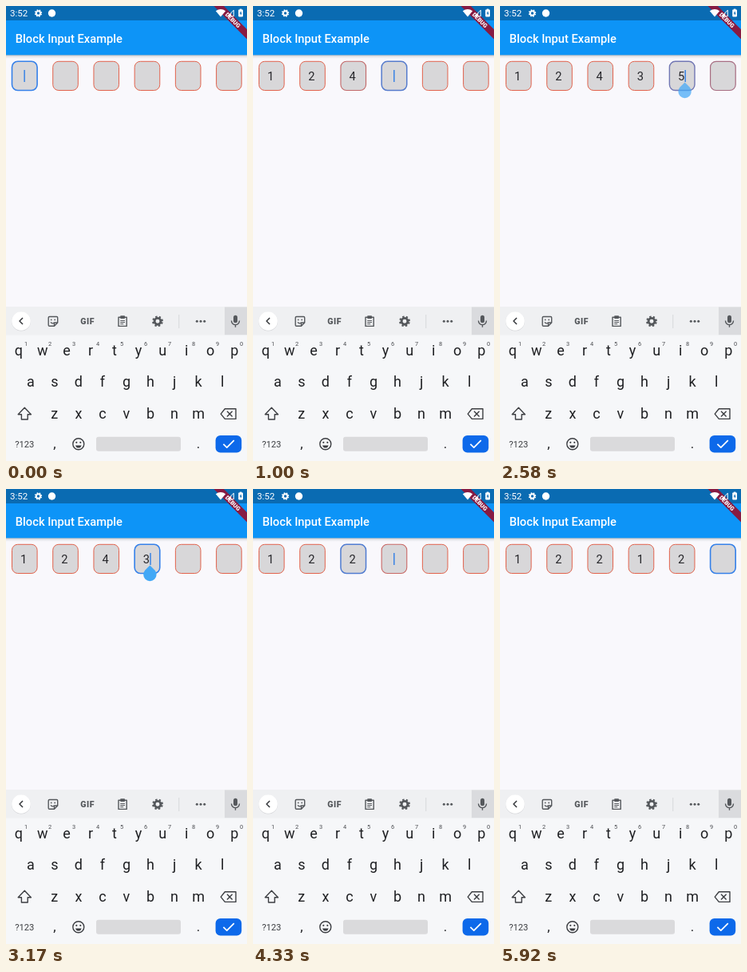
These frames come from a looping animation (302 px wide and 569 px high, 6.01 s). An HTML page:

```html
<!DOCTYPE html>
<html lang="en">
<head>
<meta charset="utf-8">
<title>Block Input Example</title>
<style>
  html, body { margin: 0; width: 100%; height: 100%; overflow: hidden; background: #f9f8fc; }
  svg { display: block; width: 302px; height: 569px; font-family: Roboto, sans-serif; }
</style>
</head>
<body>
<svg id="stage" viewBox="0 0 302 569">
  <defs>
    <linearGradient id="shade" x2="0" y2="1">
      <stop offset="0" stop-color="#000" stop-opacity=".28"/>
      <stop offset=".4" stop-color="#000" stop-opacity=".08"/>
      <stop offset="1" stop-color="#000" stop-opacity="0"/>
    </linearGradient>
  </defs>
</svg>
<script>
const LOOP = 6010, FADE = 167, BLINK = 500;
const RED = [226, 98, 76], BLUE = [54, 129, 233];
const INK = '#1f2023', GREY = '#55585c';
const stage = document.getElementById('stage');

// [start ms, digits entered, focused box, drag handle shown]
const steps = [
  [0, '', 0],
  [620, '1', 1],
  [760, '12', 2],
  [880, '124', 3],
  [1340, '1243', 4],
  [1900, '12435', 5],
  [2480, '12435', 4, true],
  [2980, '1243', 3, true],
  [3280, '124', 2, true],
  [3520, '12', 1, true],
  [3740, '1', 0, true],
  [3900, '', 0],
  [4050, '1', 1],
  [4170, '12', 2],
  [4290, '122', 3],
  [4800, '1221', 4],
  [5200, '12212', 5],
];

const rect = (x, y, w, h, fill, rx = 0, more = '') =>
  `<rect x="${x}" y="${y}" width="${w}" height="${h}" rx="${rx}" fill="${fill}" ${more}/>`;
const disc = (x, y, r, fill, more = '') =>
  `<circle cx="${x}" cy="${y}" r="${r}" fill="${fill}" ${more}/>`;
const ring = (x, y, r, color, w, more = '') =>
  disc(x, y, r, 'none', `stroke="${color}" stroke-width="${w}" ${more}`);
const line = (d, color, w = 1.4) =>
  `<path d="${d}" fill="none" stroke="${color}" stroke-width="${w}" stroke-linejoin="round"/>`;
const shape = (d, fill) => `<path d="${d}" fill="${fill}"/>`;
const label = (s, x, y, size, fill, more = '') =>
  `<text x="${x}" y="${y}" font-size="${size}" fill="${fill}" ${more}>${s}</text>`;
const MID = 'text-anchor="middle"';

function gear(x, y, r, color) {
  const teeth = r * .83, dash = teeth * Math.PI / 8;
  return ring(x, y, r * .57, color, r * .42) +
    ring(x, y, teeth, color, r * .34, `stroke-dasharray="${dash}" transform="rotate(11 ${x} ${y})"`);
}

function appBar() {
  return rect(0, 61, 302, 5, 'url(#shade)') +
    rect(0, 0, 302, 18, '#0a6bb2') +
    rect(0, 18, 302, 43.3, '#0d94f7') +
    label('Block Input Example', 11.8, 45.6, 14.7, '#fff', 'font-weight="500"') +
    `<g transform="translate(302 0) rotate(45)">
      ${rect(-32, 20.6, 64, 8.8, '#871b42')}
      ${label('DEBUG', 0, 27.6, 7.3, '#fff', MID + ' font-weight="900"')}
    </g>`;
}

function statusBar() {
  return label('3:52', 5, 13, 11.6, '#fff') +
    gear(40.5, 9, 4.7, '#fff') +
    disc(57.5, 9, 4.7, '#fff') +
    shape('M262.8 6.2Q269 1.8 275.2 6.2L269 13.6Z', '#fff') +
    line('M278 12.8L285.3 5.2V12.8Z', '#fff', 1) +
    shape('M278 12.8L282.2 8.6V12.8Z', '#fff') +
    rect(291.2, 4.6, 5.8, 8.8, '#fff', .8) +
    rect(292.8, 3.6, 2.6, 1.5, '#fff') +
    shape('M294.6 6L292.6 9.4H293.9V12L295.7 8.6H294.5Z', '#0a6bb2');
}

function toolbar() {
  return rect(0, 376, 302, 36, '#eff0f2') +
    rect(274, 376.5, 28, 35, '#dadbde') +
    disc(19, 394.6, 12, '#d8d9dc') + disc(19, 394, 11.8, '#fff') +
    line('M21 390L17 394L21 398', '#33363a', 1.5) +
    line('M54.5 388.5H63.5Q64.7 388.5 64.7 389.7V396L60.5 400.2H54.5Q53.2 400.2 53.2 399V389.7Q53.2 388.5 54.5 388.5ZM64.7 396H60.5V400.2M56 395.4Q58 398 60.4 396', GREY) +
    disc(56.7, 392.4, .9, GREY) + disc(61.2, 392.4, .9, GREY) +
    label('GIF', 102.2, 397.7, 10.6, GREY, MID + ' font-weight="900" letter-spacing=".6"') +
    line('M141 389.2H151.2V400.4H141Z', GREY) +
    rect(143.2, 387.2, 5.8, 3.8, GREY, .8) +
    line('M143.2 393.4H149M143.2 395.5H149M143.2 397.6H147.2', GREY, 1) +
    gear(190, 394.3, 6.9, GREY) +
    rect(216.4, 386, .8, 17, '#d0d2d5') +
    [239.3, 244, 248.7].map(x => disc(x, 394.3, 1.5, GREY)).join('') +
    rect(285, 386.8, 5, 9.4, GREY, 2.5) +
    line('M282.5 393.6A5 5 0 0 0 292.5 393.6M287.5 398.6V401.8', GREY);
}

function keys() {
  const row = (letters, x, y) => [...letters].map((c, i) =>
    label(c, x + i * 30.05, y, 18, INK, MID)).join('');
  const digits = [...'1234567890'].map((c, i) =>
    label(c, 25 + i * 30, 424.8, 7.4, '#4a4c50', MID)).join('');
  return rect(0, 411.5, 302, 158, '#f6f7f9') + digits +
    row('qwertyuiop', 15.8, 437.3) +
    row('asdfghjkl', 30.8, 476.3) +
    row('zxcvbnm', 60.8, 515.5) +
    line('M23.3 502.3L31.4 510.8H27.2V517H19.4V510.8H15.2Z', '#3c3e42', 1.4) +
    line('M274.3 503.8H288V516.4H274.3L269.2 510.1Z', '#3c3e42', 1.4) +
    line('M277 506.8L283.6 513.4M283.6 506.8L277 513.4', '#3c3e42', 1.4) +
    label('?123', 23.3, 551.8, 11.2, '#3c3e42', MID) +
    label(',', 61, 553, 17, INK, MID) +
    ring(90.8, 547.8, 7, '#3c3e42', 1.4) +
    disc(88.3, 545.8, 1.1, '#3c3e42') + disc(93.3, 545.8, 1.1, '#3c3e42') +
    shape('M87 549.4H94.6Q93.4 552.6 90.8 552.6Q88.2 552.6 87 549.4Z', '#3c3e42') +
    rect(113, 538.8, 106, 18, '#dadadc', 3) +
    label('.', 241, 553, 17, INK, MID) +
    rect(262.6, 537, 32.6, 21.6, '#0d69ea', 6) +
    line('M272.4 547.8L276.8 552.2L285.8 543.2', '#fff', 1.7);
}

const center = i => 23.3 + i * 51.22;
const box = i => rect(center(i) - 15.8, 69.3, 31.6, 36.2, '#d8d7d9', 7.2, 'class="box"') +
  label('', center(i) - 1.1, 92.9, 14.7, '#26262a', MID + ' class="digit"');

stage.insertAdjacentHTML('beforeend',
  appBar() + statusBar() + [0, 1, 2, 3, 4, 5].map(box).join('') +
  rect(-.7, 80, 1.5, 15, '#3b84e4', 0, 'id="caret"') +
  `<path id="handle" d="M0 95.4L5.8 101.2A8.2 8.2 0 1 1 -5.8 101.2Z" fill="#42a8f6"/>` +
  toolbar() + keys());

const boxes = stage.querySelectorAll('.box');
const digits = stage.querySelectorAll('.digit');
const caret = document.getElementById('caret');
const handle = document.getElementById('handle');
const clamp = v => Math.min(1, Math.max(0, v));
const smooth = v => v * v * (3 - 2 * v);
const mix = (a, b, k) => a + (b - a) * k;

function draw(time) {
  const n = steps.findLastIndex(s => s[0] <= time);
  const [start, text, focus, held] = steps[n];
  const previous = n ? steps[n - 1][2] : focus;
  const age = time - start;
  const k = smooth(clamp(age / FADE));

  boxes.forEach((el, i) => {
    let on = 0;
    if (i === previous) on = 1 - k;
    if (i === focus) on = previous === focus ? 1 : k;
    el.setAttribute('stroke', `rgb(${RED.map((c, j) => Math.round(mix(c, BLUE[j], on)))})`);
    el.setAttribute('stroke-width', mix(1, 1.6, on));
    digits[i].textContent = text[i] || '';
  });

  const x = center(focus) + (text[focus] ? 4 : -.2);
  caret.setAttribute('transform', `translate(${x} 0)`);
  caret.setAttribute('opacity', age % (2 * BLINK) < BLINK ? 1 : 0);
  handle.setAttribute('transform', `translate(${x - .6} 0)`);
  handle.setAttribute('opacity', held ? clamp(age / 140) : 0);
}

function tick() {
  draw(performance.now() % LOOP);
  requestAnimationFrame(tick);
}
tick();
</script>
</body>
</html>
```
